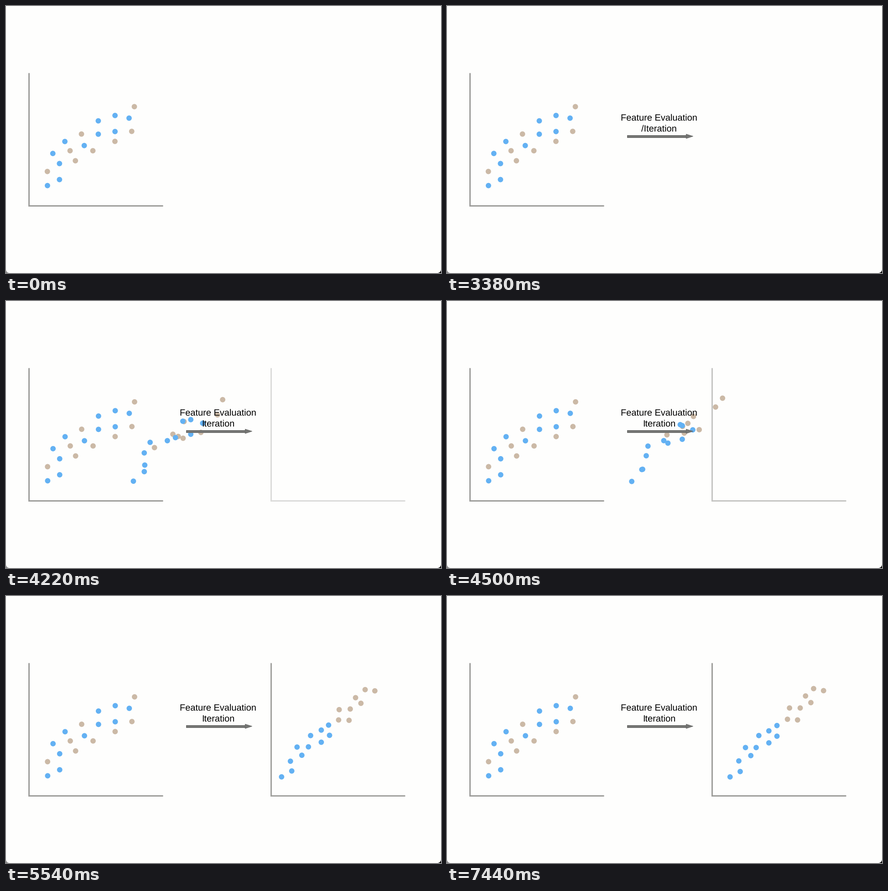
Write a matplotlib script that moves like this. It is 954 px wide and 587 px high and loops after 7.46 s.

```python
import numpy as np
import matplotlib.pyplot as plt
from matplotlib.animation import FuncAnimation
from matplotlib.patches import Polygon

W, H, DPI = 954, 587, 64  # a power of two keeps the pixel size exact
LOOP_MS, STEP_MS = 7460, 20
PX = 72 / DPI  # points per pixel

BACK, BLUE, TAN, AXIS = "#fefefd", "#63b1f3", "#cbb9a6", "#9d9d9a"
LABEL_START, LABEL_MS = 1580, 1300
MOVE_START, MOVE_MS = 3677, 2400
DOT_DIAMETER = 11.8
SHIFT = 0.45

# Each row: x, y in the left chart, then x, y in the right chart.
BLUE_DOTS = np.array([
    (90.9, 394.8, 620.8, 397.7), (117.3, 381.6, 640.0, 362.6),
    (117.3, 346.4, 643.0, 385.9), (102.7, 324.2, 666.3, 350.9),
    (129.1, 297.9, 654.6, 333.2), (171.6, 306.8, 683.9, 306.8),
    (202.4, 281.8, 678.0, 333.2), (202.4, 252.5, 723.6, 284.8),
    (239.1, 276.0, 705.9, 322.9), (239.1, 240.7, 705.9, 296.5),
    (269.9, 246.5, 723.6, 308.2),
])
TAN_DOTS = np.array([
    (90.7, 363.8, 751.2, 246.2), (140.5, 318.2, 774.6, 246.2),
    (152.2, 340.2, 786.3, 219.8), (165.5, 281.5, 798.0, 234.4),
    (190.5, 318.2, 746.7, 271.0), (238.9, 297.6, 768.8, 272.5),
    (281.5, 221.3, 825.8, 208.1), (275.7, 275.6, 804.0, 203.6),
])
DOTS = np.vstack([TAN_DOTS, BLUE_DOTS])
LEFT, RIGHT = DOTS[:, :2], DOTS[:, 2:]
COLORS = [TAN] * len(TAN_DOTS) + [BLUE] * len(BLUE_DOTS)

# Cubic Bezier timing curve with handles (.25, .1) and (.25, 1).
s = np.linspace(0, 1, 400)
EASE_X = 0.75 * s * (1 - s) ** 2 + 0.75 * s**2 * (1 - s) + s**3
EASE_Y = 0.3 * s * (1 - s) ** 2 + 3 * s**2 * (1 - s) + s**3


def ease(t, start, duration):
    return float(np.interp((t - start) / duration, EASE_X, EASE_Y))


plt.rcParams["text.hinting"] = "none"
fig = plt.figure(figsize=(W / DPI, H / DPI), dpi=DPI, facecolor=BACK)
ax = fig.add_axes([0, 0, 1, 1])
ax.set(xlim=(0, W), ylim=(H, 0))
ax.axis("off")


def chart_axes(x):
    return ax.plot([x, x, x + 293.5], [147, 438.5, 438.5], color=AXIS,
                   lw=3 * PX, solid_capstyle="butt",
                   solid_joinstyle="miter", zorder=1)[0]


def dot_cloud(zorder):
    return ax.scatter(*LEFT.T, s=(DOT_DIAMETER * PX) ** 2, c=COLORS,
                      linewidths=0, zorder=zorder)


def label(text, baseline):
    return ax.text(465, baseline, text, family="Liberation Sans",
                   size=20 * PX, color="black", ha="center",
                   va="baseline", zorder=6)


def arrow_part(points):
    return ax.add_patch(Polygon(points, facecolor="#757674",
                                edgecolor="#676866", lw=PX, zorder=5))


def window_corner(x, inward, color):
    """Fill what lies outside a rounded bottom corner."""
    r = 8
    a = np.linspace(0, np.pi / 2, 16)
    arc = np.column_stack([x + inward * r * (1 - np.cos(a)),
                           H - r + r * np.sin(a)])
    ax.add_patch(Polygon(np.vstack([arc, (x, H)]), color=color, lw=0,
                         zorder=7))


chart_axes(50)
right_axes = chart_axes(581)
left_dots = dot_cloud(2)
moving_dots = dot_cloud(3)
title = label("Feature Evaluation", 251.5)
subtitle = label("/Iteration", 275.8)
shaft = arrow_part([(395.3, 284), (525, 284), (525, 288.7), (395.3, 288.7)])
head = arrow_part([(524.5, 281.8), (539.5, 286.4), (524.5, 291.2)])
window_corner(0, 1, "#8c8c8c")
window_corner(W, -1, "#080808")


def update(frame):
    t = frame * STEP_MS
    shown = ease(t, LABEL_START, LABEL_MS)
    moved = ease(t, MOVE_START, MOVE_MS)
    moving = t >= MOVE_START

    for part in (title, subtitle, shaft, head):
        part.set_alpha(shown)
    subtitle.set_text("Iteration" if moving else "/Iteration")

    start = LEFT + SHIFT * moving
    left_dots.set_offsets(start)
    moving_dots.set_offsets(start + (RIGHT - start) * moved)
    moving_dots.set_visible(moving)
    right_axes.set_alpha(moved)
    return ()


anim = FuncAnimation(fig, update, frames=LOOP_MS // STEP_MS,
                     interval=STEP_MS, repeat=True, repeat_delay=0)
plt.show()
```
